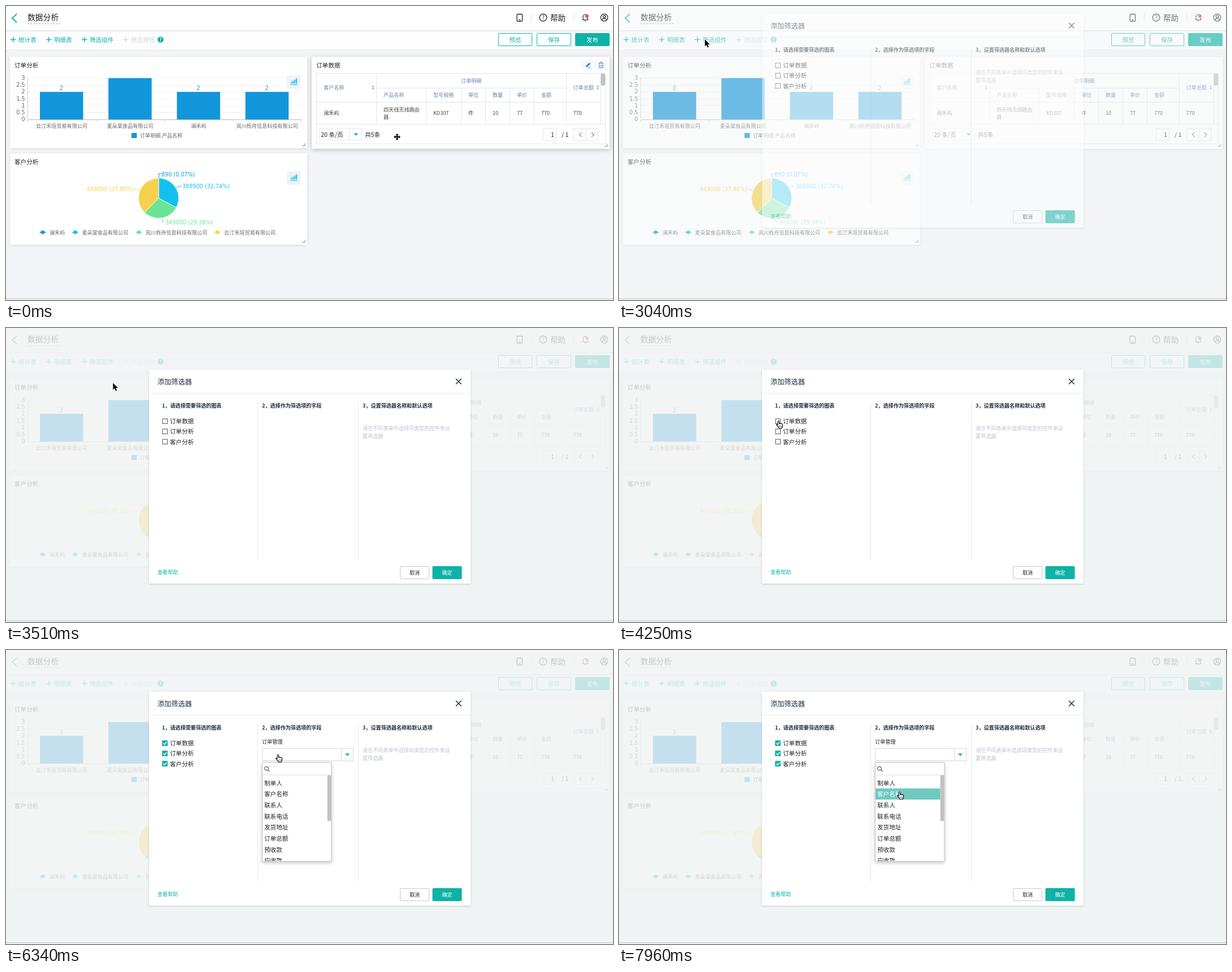
Animation of 1074x521 px, one loop 8000 ms. Source, as an HTML page:

```html
<!DOCTYPE html>
<html lang="zh-CN">
<head>
<meta charset="utf-8">
<style>
html, body { margin: 0; width: 100%; height: 100%; overflow: hidden; background: #f3f4f8; }
svg { display: block; font-family: "Noto Sans CJK SC", "Noto Sans CJK", "Noto Sans", sans-serif; }
.num { font-family: "DejaVu Sans", "Noto Sans CJK SC", sans-serif; }
.panel { filter: drop-shadow(0 1px 2px #0000001f); }
.panel.hover { filter: drop-shadow(0 2px 4px #00000038); }
.modal { filter: drop-shadow(0 1px 1.5px #0000002e); }
.menu { filter: drop-shadow(0 2px 3px #00000040); }
</style>
</head>
<body>
<svg id="stage" width="1074" height="521" viewBox="0 0 1074 521"></svg>
<script>
const TEAL = '#0db3a6', BLUE = '#1296db', CYAN = '#13c1ef', GREEN = '#6be496', YELLOW = '#f6d14f';
const INK = '#222', NAVY = '#1f2d3d', GRAY = '#666', HEAD = '#6a82a8', LINE = '#e1e5ec';
const CLIENTS = ['云汀禾垣贸易有限公司', '麦朵棠食品有限公司', '澜禾屿', '岚川栎舟信息科技有限公司'];
const FIELDS = ['制单人', '客户名称', '联系人', '联系电话', '发货地址', '订单总额', '预收款', '应收款'];

// y is the vertical middle of the glyphs
const text = (x, y, s, size = 9.1, fill = INK, attrs = '') =>
  `<text x="${x}" y="${y + size * .38}" font-size="${size}" fill="${fill}" ${attrs}>${s}</text>`;
const MID = 'text-anchor="middle"';
const rect = (x, y, w, h, fill, attrs = '') =>
  `<rect x="${x}" y="${y}" width="${w}" height="${h}" fill="${fill}" ${attrs}/>`;
const box = (x, y, w, h, stroke, fill = '#fff', r = 0) =>
  rect(x + .5, y + .5, w - 1, h - 1, fill, `stroke="${stroke}" rx="${r}"`);
const path = (d, stroke, w = 1, fill = 'none', attrs = '') =>
  `<path d="${d}" stroke="${stroke}" stroke-width="${w}" fill="${fill}" ${attrs}/>`;
const circle = (x, y, r, fill, stroke = 'none', w = 1) =>
  `<circle cx="${x}" cy="${y}" r="${r}" fill="${fill}" stroke="${stroke}" stroke-width="${w}"/>`;
const group = (id, body, attrs = '') => `<g id="${id}" ${attrs}>${body}</g>`;
const button = (x, y, w, h, s, size, solid, edge = TEAL, ink = TEAL) =>
  box(x, y, w, h, edge, solid ? TEAL : '#fff', 1) + text(x + w / 2, y + h / 2, s, size, solid ? '#fff' : ink, MID);
const caret = (x, y) => path(`M${x - 4} ${y - 2}h8l-4 4.5z`, 'none', 0, TEAL);

function header() {
  const tools = [[8, '统计表'], [71, '明细表'], [134, '筛选组件'], [207, '筛选按钮']];
  return rect(0, 0, 1074, 43, '#fff') + rect(0, 43, 1074, 2, '#e7e9ee') + rect(0, 45, 1074, 32, '#fdfdfe') +
    path('M0 77.5h1074', '#eceef2') +
    path('M19 14l-8 7.5l8 7.5', TEAL, 2) +
    text(38, 20, '数据分析', 13.8) + path('M38 31.5h60', '#aaa', 1, 'none', 'stroke-dasharray="3 2"') +
    rect(904, 14.5, 9.5, 12.5, 'none', 'stroke="#222" stroke-width="1.3" rx="1.5"') + path('M907 24.5h3.5', INK, 1.2) +
    path('M929.5 13v14M1004.5 13v14', '#e2e2e2') +
    circle(950.5, 20.5, 6.3, 'none', INK, 1.3) + text(950.5, 20.5, '?', 10, INK, MID) +
    text(963, 20.5, '帮助', 13.6, INK, 'font-weight="500"') +
    path('M1019.5 24.5h11M1021 24v-5a4 4 0 0 1 8 0v5M1023.5 26.5h3', INK, 1.2) + circle(1027.8, 17.8, 3, '#e8484d') +
    circle(1058.5, 20.5, 6.3, 'none', INK, 1.2) + circle(1058.5, 18.7, 2.2, 'none', INK, 1.2) +
    path('M1054.3 25c1-4 7.4-4 8.4 0', INK, 1.2) +
    tools.map(([x, s], i) => {
      const c = i < 3 ? TEAL : '#d3d7dc';
      return path(`M${x} 59.5h9.5m-4.75-4.75v9.5`, c, 1.4) + text(x + 14, 59.5, s, 10.6, c);
    }).join('') +
    circle(273.5, 59.5, 5.3, TEAL) + text(273.5, 59.5, '?', 8.5, '#fff', MID + ' font-weight="700"') +
    button(871, 48, 60, 23, '预览', 10.6) + button(939, 48, 61, 23, '保存', 10.6) +
    button(1007, 48, 61, 23, '发布', 10.6, true);
}

const panel = (x, y, w, h, title, attrs = '') =>
  rect(x, y, w, h, '#fff', `class="panel" ${attrs}`) + text(x + 8, y + 15, title, 10.6) +
  path(`M${x + w - 9} ${y + h - 4.5}h5v-4`, '#888');

const chartIcon = y => rect(497, y, 24.5, 24, '#f1f2f5', 'rx="1"') +
  [3, 5, 7, 9].map((h, i) => rect(504 + i * 3, y + 14.5 - h, 2, h, CYAN)).join('') +
  path(`M503 ${y + 16.5}h13`, CYAN);

function barChart() {
  const base = 200.5, unit = 24.4;
  let s = panel(7, 90, 526, 162, '订单分析');
  for (let v = 0; v <= 3; v += .5) {
    const y = base - v * unit;
    s += path(`M38 ${Math.round(y) + .5}h484`, v ? '#f0f1f3' : '#bbb') + text(33.5, y, v, 9.6, GRAY, 'text-anchor="end" class="num"');
  }
  s += path('M38.5 127v73', '#ccc');
  [2, 3, 2, 2].forEach((v, i) => {
    const x = 38.5 + i * 121.2;
    s += rect(x + 21.5, base - v * unit + .5, 76.5, v * unit, BLUE) + text(x + 60, 212.5, CLIENTS[i], 9.1, GRAY, MID) +
      path(`M${x} 201v4`, '#ccc');
    if (v < 3) s += text(x + 59.5, 145, v, 9.6, BLUE, MID + ' class="num"');
  });
  return s + path('M522.5 201v4', '#ccc') + rect(222, 225, 9.5, 9, BLUE) + text(237, 229.5, '订单明细.产品名称', 9.1, GRAY) + chartIcon(123);
}

function pieChart() {
  const at = f => `${270 + 35.5 * Math.sin(f * 2 * Math.PI)} ${340.5 - 35.5 * Math.cos(f * 2 * Math.PI)}`;
  const slices = [[.0007, BLUE], [.3274, CYAN], [.2938, GREEN], [.378, YELLOW]];
  let s = panel(7, 261, 526, 162, '客户分析'), from = 0;
  for (const [part, color] of slices) {
    s += path(`M270 340.5L${at(from)}A35.5 35.5 0 0 1 ${at(from + part)}z`, '#fff', .8, color);
    from += part;
  }
  const label = (x, y, t, c, d) => text(x, y, t, 9.6, c, 'class="num"') + path(d, c);
  s += label(275, 298, '890 (0.07%)', BLUE, 'M270.5 305v-7.5h4') +
    label(312, 319, '388900 (32.74%)', CYAN, 'M301 322.5q4-3.5 10-3.5') +
    label(143, 324.5, '449000 (37.80%)', YELLOW, 'M236.5 327.5q-4-3-9-3') +
    label(282, 383, '349000 (29.38%)', GREEN, 'M276.5 376v6.5h4');
  [[65, 2, BLUE], [122.5, 1, CYAN], [235, 3, GREEN], [374, 0, YELLOW]].forEach(([x, i, c]) => {
    s += path(`M${x - 6} 401q4-1.5 6-4q2 2.5 6 4q-4 1.5-6 4q-2-2.5-6-4z`, 'none', 0, c) + text(x + 12, 401.5, CLIENTS[i], 9.1, GRAY);
  });
  return s + chartIcon(293);
}

function table() {
  const sorter = (x, y) => path(`M${x - 2} ${y - 1}l2-2.5l2 2.5zM${x - 2} ${y + 1}l2 2.5l2-2.5z`, 'none', 0, '#888');
  const cols = [[668, '产品名称'], [756, '型号规格', 'KD307'], [818, '单位', '件'], [861, '数量', '10'],
    [904, '单价', '77'], [947, '金额', '770']];
  return panel(541, 90, 527, 163, '订单数据', 'id="dataPanel"') +
    box(549, 119, 512, 126, LINE) +
    path('M655 145.5h336M549 170.5h503M549 209.5h511M655.5 119v90M991.5 119v90M1052.5 119v90' +
      [743, 805, 848, 891, 934].map(x => `M${x}.5 145v64`).join(''), LINE) +
    text(562, 144.5, '客户名称', 9.1, HEAD) + sorter(649.5, 144.5) + text(823, 132.5, '订单明细', 9.1, HEAD, MID) +
    text(1003.5, 144.5, '订单总额', 9.1, HEAD) + sorter(1047, 144.5) +
    cols.map(([x, h, v]) => text(x, 158, h, 9.1, HEAD) + (v ? text(x, 190, v, 9.1, '#444') : '')).join('') +
    text(668, 184, '四天线无线路由', 9.1, '#444') + text(668, 197, '器', 9.1, '#444') +
    text(562, 190, CLIENTS[2], 9.1, '#444') + text(1003.5, 190, '770', 9.1, '#444') +
    rect(1052.5, 120, 7.5, 21, '#bfc1c4', 'rx="2"') +
    box(554, 217, 76, 21, LINE) + path('M607.5 217v21', LINE) + text(557, 227.5, '20 条/页', 10.6) + caret(619, 227.5) +
    text(635, 227.5, '共5条', 10.6) +
    box(950, 217, 24, 22, LINE) + text(967, 228, '1', 10.6, INK, MID) + text(983, 228, '/ 1', 10.6) +
    box(1004, 217, 44, 22, LINE) + path('M1026.5 217v22', LINE) +
    path('M1018.5 224l-4 4l4 4M1036 224l4 4l-4 4', '#444') +
    group('panelTools',
      rect(1018, 96, 46, 18, '#f8f9fc') +
      path('M1026 108.5l.5-2.5l5.5-5.5l2 2l-5.5 5.5z', 'none', 0, '#2a7fd0') + path('M1030 109h4', '#2a7fd0') +
      path('M1048.5 101.5h8.5M1051 101v-1.5h3.5v1.5M1049.5 102v7.5h6.5v-7.5M1051.5 104v4M1054 104v4', '#5b8fc0'));
}

function modal() {
  const checks = ['订单数据', '订单分析', '客户分析'].map((s, i) => {
    const y = 165 + i * 18.1;
    return rect(277, y - 4, 8.5, 8.5, '#fff', 'stroke="#555"') +
      group('check' + i, rect(276.5, y - 4.5, 9.5, 9.5, TEAL, 'rx="1"') + path(`M278.5 ${y}l2 2.5l4-4.5`, '#fff', 1.4)) +
      text(290, y + .3, s, 10.6);
  }).join('');
  const step = (x, s) => text(x, 138, s, 9.1, NAVY, 'font-weight="700"');
  return rect(253, 74, 569, 379, '#fff', 'class="modal"') +
    text(268, 95, '添加筛选器', 12.2, NAVY) + path('M796 90l9.5 9.5m0-9.5l-9.5 9.5', NAVY, 1.5) +
    path('M253 115.5h569', '#eaecef') + path('M445.5 131v280M623.5 131v280', '#e6e8eb') +
    step(276, '1，请选择需要筛选的图表') + step(453, '2，选择作为筛选项的字段') +
    step(631, '3，设置筛选器名称和默认选项') + checks +
    text(631, 178, '请在不同表单中选择同类型的控件来设', 9.1, '#bcc3cf') + text(631, 191.5, '置筛选器', 9.1, '#bcc3cf') +
    text(268, 433, '查看帮助', 9.1, TEAL) +
    button(697, 422, 52, 23, '取消', 9.1, false, '#c4c8ce', INK) + button(754.5, 422, 52, 23, '确定', 9.1, true) +
    group('select', text(453, 162.5, '订单管理') + box(453, 174, 162, 23, '#d4d8de') +
      path('M593.5 174v23', '#d4d8de') + caret(604, 185.5)) +
    group('menu', rect(453.5, 199.5, 122, 175, '#fff', 'stroke="#ccc" class="menu"') +
      circle(461, 210, 3.3, 'none', '#777', 1.4) + path('M463.5 212.5l3 3', '#777', 1.6) + path('M454 221.5h121', '#ddd') +
      rect(454, 0, 114.5, 19.7, '#6fc9c0', 'id="highlight"') +
      group('fields', FIELDS.map((s, i) => text(457, 235.5 + i * 19.7, s, 10.6)).join(''), 'clip-path="url(#menuClip)"') +
      rect(568.5, 222, 7, 81, '#c2c2c2', 'rx="2"'));
}

const cursors =
  group('move', path('M0-6l2.8 3h-1.8v2h2v-1.8l3 2.8l-3 2.8v-1.8h-2v2h1.8l-2.8 3l-2.8-3h1.8v-2h-2v1.8l-3-2.8l3-2.8v1.8h2v-2h-1.8z',
    '#fff', 1.2, '#000', 'paint-order="stroke"')) +
  group('arrow', path('M0 .5v12l2.8-2.6l2 4.7l2-.9l-2-4.5h3.9z', '#fff', 1, '#000', 'paint-order="stroke"')) +
  group('hand', path('M0 1.5q1.5-2.5 2.5 0v4q1.2-1.2 2.2 0q1.3-.9 2.2.4q1.6-.3 1.6 1.4v2.5q-.5 2-1.5 3.7h-5q-1.5-3-4.5-5.8q.5-1.6 2.5-.2z',
    '#000', 1.1, '#fff') + path('M2.5 9v2.5M4.5 9v2.5M6.5 9v2.5', '#000', .7));

const $ = id => document.getElementById(id);
$('stage').innerHTML = '<clipPath id="menuClip">' + rect(453, 222, 122, 152, '#000') + '</clipPath>' +
  rect(0, 0, 1074, 521, '#f3f4f8') + header() + barChart() + pieChart() + table() +
  rect(0, 0, 1074, 521, '#f1f3f3', 'id="mask"') + rect(0, 518, 1074, 1, '#c5c7cb') + rect(0, 519, 1074, 2, '#eef0f3') +
  group('modal', modal()) + group('cursor', cursors);

// Bursts of movement: start, end, number of screen updates
const BURSTS = [[0, 0, 1], [300, 1260, 7], [2600, 2600, 1], [3040, 3950, 7], [4100, 4990, 7],
  [5290, 6040, 6], [6340, 7380, 8], [7520, 7960, 4]];
// Cursor route: time, x, y
const ROUTE = [[0, 692, 232], [300, 655, 220], [620, 400, 130], [940, 165, 64], [1100, 139, 60], [1260, 151, 59],
  [2600, 152, 59], [3200, 152, 59], [3350, 156, 66], [3650, 225, 130], [3950, 281, 166], [4250, 281, 164],
  [4400, 281, 164], [4700, 281, 182], [4990, 281, 200], [5290, 300, 200], [6040, 480, 185], [6340, 480, 185],
  [6640, 488, 210], [7080, 502, 267], [7380, 502, 267], [7960, 495, 251]];

function snap(t) {
  const [start, end, count] = BURSTS.findLast(b => b[0] <= t);
  if (count === 1) return start;
  const step = (end - start) / (count - 1);
  return start + Math.min(count - 1, Math.floor((t - start) / step + .03)) * step;
}

function cursorAt(t) {
  const i = ROUTE.findLastIndex(p => p[0] <= t), a = ROUTE[i], b = ROUTE[i + 1] || a;
  const k = b === a ? 0 : (t - a[0]) / (b[0] - a[0]);
  return [a[1] + (b[1] - a[1]) * k, a[2] + (b[2] - a[2]) * k];
}

const show = (id, on) => $(id).setAttribute('visibility', on ? 'inherit' : 'hidden');

function render(time) {
  const t = snap(time), [x, y] = cursorAt(t);
  const kind = t < 2600 ? 'move' : t < 3940 || (t >= 5290 && t < 6030) ? 'arrow' : 'hand';
  $('cursor').setAttribute('transform', `translate(${x} ${y})`);
  for (const id of ['move', 'arrow', 'hand']) show(id, id === kind);

  const hovering = t < 2600 && x > 541;
  show('panelTools', hovering);
  $('dataPanel').setAttribute('class', hovering ? 'panel hover' : 'panel');

  const phase = t < 3040 ? 0 : t < 3150 ? 1 : t < 3300 ? 2 : 3;
  $('mask').setAttribute('opacity', [0, .4, .8, .8][phase]);
  $('modal').setAttribute('opacity', [0, .5, 1, 1][phase]);
  $('modal').setAttribute('transform', `translate(0 ${[0, -60, -22, 0][phase]})`);
  for (let i = 0; i < 3; i++) show('check' + i, t >= 4390 + i * 298);
  show('select', t >= 4390);

  const open = t >= 6340, row = open ? Math.floor((y - 225.6) / 19.7) : -1;
  show('menu', open);
  show('highlight', row >= 0);
  $('highlight').setAttribute('y', 225.6 + row * 19.7);
  [...$('fields').children].forEach((el, i) => el.setAttribute('fill', i === row ? '#fff' : INK));
}

const began = performance.now();
(function tick() {
  render((performance.now() - began) % 8000);
  requestAnimationFrame(tick);
})();
</script>
</body>
</html>
```
